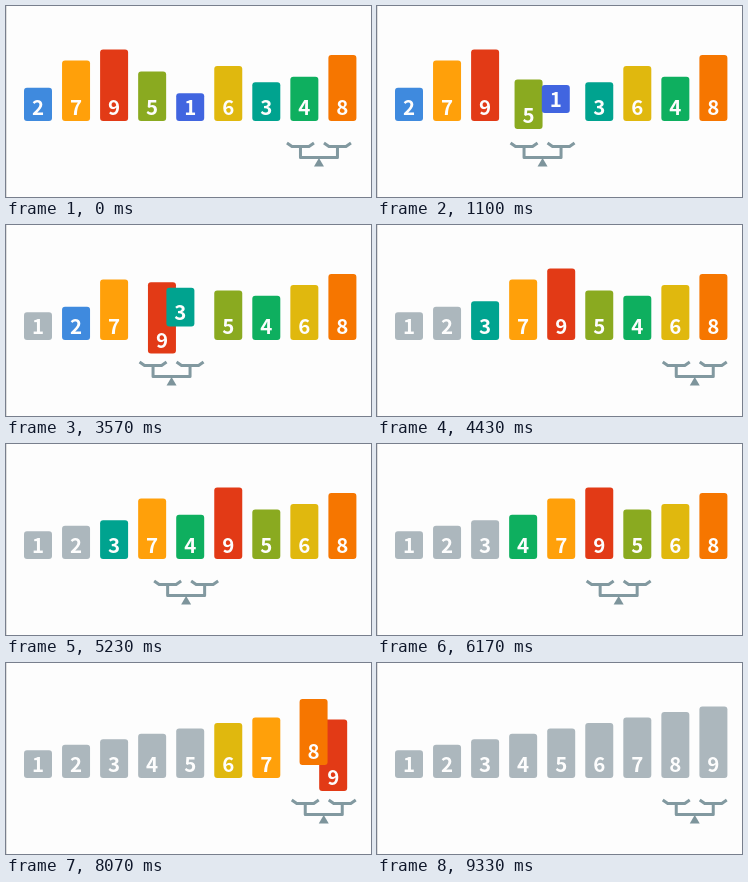
Recreate the animation shown at these times as an HTML page. Size 365 by 191 pixels, loop 9.53 s.

```html
<!DOCTYPE html>
<html lang="en">
<head>
<meta charset="utf-8">
<title>Bubble sort</title>
<style>
  html, body { margin: 0; width: 100%; height: 100%; overflow: hidden; background: #fdfdfd; }
  svg { display: block; width: 100%; height: 100%; }
  text { font: 700 20.5px "Noto Sans CJK JP", "Noto Sans CJK", "Noto Sans", sans-serif; fill: #fdfdfd; text-anchor: middle; }
  #scale path { fill: none; stroke: #8299a0; stroke-width: 3; stroke-linejoin: round; }
  #scale polygon { fill: #7d949b; }
</style>
</head>
<body>
<svg viewBox="0 0 365 191">
  <rect width="1" height="191" fill="#dedede"/>
  <g id="scale">
    <path d="M-32 137 l5 3.5 h17 l5 -3.5 M5 137 l5 3.5 h17 l5 -3.5"/>
    <path d="M-18.5 141 V151.5 H18.5 V141"/>
    <polygon points="0,152 5,160.5 -5,160.5"/>
  </g>
  <g id="cards"></g>
</svg>
<script>
const NS = 'http://www.w3.org/2000/svg';
const LOOP = 9530, FADE = 100, RETURN = 100, LIFT = 18.8;
const START = [2, 7, 9, 5, 1, 6, 3, 4, 8];
const COLORS = [[65, 101, 224], [63, 138, 222], [0, 163, 143], [14, 175, 95], [138, 170, 32],
  [224, 184, 14], [255, 160, 10], [246, 118, 0], [226, 58, 22]];
const DONE = [172, 183, 189];
// when each pass begins; the first one is slower and already running
const PASSES = [-220, 2550, 4305, 5730, 6930, 7950, 8630, 9090];
const SLOW = { move: 104, wait: 197, swap: 252 };
const FAST = { move: 80, wait: 140, swap: 180 };

const slotX = i => 32 + 38.05 * i;
const pairX = i => slotX(i) + 19;
const clamp = p => Math.max(0, Math.min(1, p));
const inOut = p => (1 - Math.cos(Math.PI * p)) / 2;
const out = p => 1 - (1 - p) ** 3;

// sort once and note every swap, scale move and finished card
const swaps = [], moves = [], doneAt = {};
const order = [...START];
const last = order.length - 1;
PASSES.forEach((start, pass) => {
  const pace = pass ? FAST : SLOW;
  let t = start;
  for (let i = last - 1; i >= pass; i--) {
    if (i < last - 1) {
      moves.push({ t, len: pace.move, from: pairX(i + 1), to: pairX(i), ease: inOut });
      t += pace.move;
    }
    if (order[i] > order[i + 1]) {
      swaps.push({ t, len: pace.swap, slot: i, big: order[i], small: order[i + 1] });
      [order[i], order[i + 1]] = [order[i + 1], order[i]];
      t += pace.swap;
    } else {
      t += pace.wait;
    }
  }
  doneAt[order[pass]] = t;
  const next = PASSES[pass + 1];
  if (next) {
    const from = Math.max(t, next - RETURN);
    moves.push({ t: from, len: next - from, from: pairX(pass), to: pairX(last - 1), ease: out });
  } else {
    doneAt[order[last]] = t;
  }
});

const add = (parent, tag, attrs) => {
  const el = parent.appendChild(document.createElementNS(NS, tag));
  for (const k in attrs) el.setAttribute(k, attrs[k]);
  return el;
};
const holder = document.getElementById('cards');
const scale = document.getElementById('scale');
const cards = {};
for (let n = 9; n > 0; n--) {
  const g = add(holder, 'g');
  const h = 27.8 + 5.45 * (n - 1);
  const box = add(g, 'rect', { x: -14, y: 115 - h, width: 28, height: h, rx: 3 });
  add(g, 'text', { x: 0, y: 109 }).textContent = n;
  cards[n] = { g, box };
}

function draw(t) {
  const pos = {};
  START.forEach((n, i) => pos[n] = [slotX(i), 0]);
  for (const s of swaps) {
    if (t < s.t) break;
    const p = inOut(clamp((t - s.t) / s.len));
    const a = slotX(s.slot), b = slotX(s.slot + 1);
    const y = LIFT * Math.sin(Math.PI * p);
    pos[s.big] = [a + (b - a) * p, y];
    pos[s.small] = [b + (a - b) * p, -y];
  }
  for (const n in cards) {
    const { g, box } = cards[n];
    const f = clamp((t - doneAt[n]) / FADE);
    const rgb = COLORS[n - 1].map((c, i) => Math.round(c + (DONE[i] - c) * f));
    g.setAttribute('transform', `translate(${pos[n]})`);
    box.setAttribute('fill', `rgb(${rgb})`);
  }
  let x = pairX(last - 1);
  for (const m of moves) {
    if (t < m.t) break;
    x = m.from + (m.to - m.from) * m.ease(clamp((t - m.t) / m.len));
  }
  scale.setAttribute('transform', `translate(${x + 0.4})`);
}

const begin = performance.now();
function tick() {
  draw((performance.now() - begin) % LOOP);
  requestAnimationFrame(tick);
}
tick();
</script>
</body>
</html>
```
